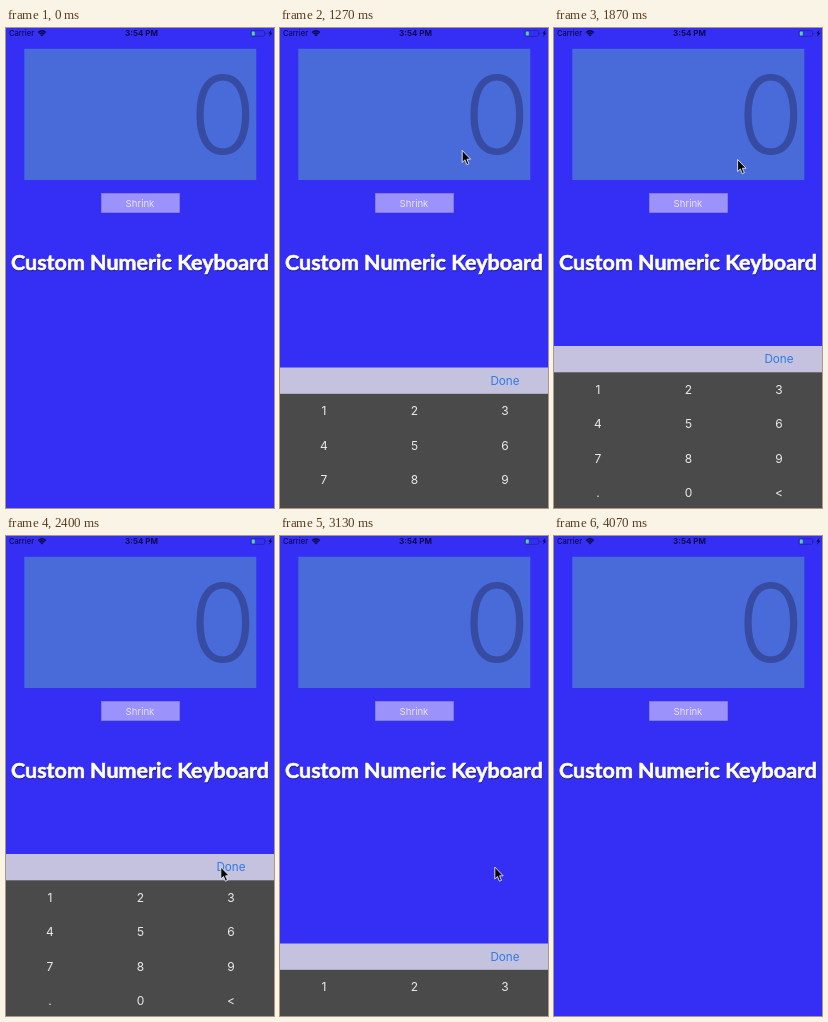
An HTML page that plays this animation: 268x480 px, repeating every 4190 ms.

```html
<!DOCTYPE html>
<html lang="en">
<head>
<meta charset="utf-8">
<title>Custom Numeric Keyboard</title>
<style>
  html, body { margin: 0; width: 100%; height: 100%; overflow: hidden; background: #352ff5; }
  svg { display: block; width: 100%; height: 100%; overflow: hidden; }
  text { font-family: Inter, "Liberation Sans", sans-serif; text-anchor: middle; }
  .digit { font-size: 108px; font-weight: 300; font-optical-sizing: none; fill: #374ba3; }
  .title { font: 700 21.5px Lato, sans-serif; fill: #fff; stroke: #fff; stroke-width: .6px; }
  .shade { fill: #14124f; stroke: #14124f; opacity: .75; filter: blur(.6px); }
  .keys text { font-size: 12px; fill: #ebebeb; }
</style>
</head>
<body>
<svg viewBox="0 0 268 480">
  <rect width="268" height="480" fill="#352ff5"/>

  <g fill="#0d0b4c">
    <text x="15.5" y="8" font-size="7.6" font-weight="500">Carrier</text>
    <text x="135.5" y="8" font-size="8" font-weight="700">3:54 PM</text>
    <path d="M36 8.6 L31.6 4 Q36 .2 40.4 4Z"/>
    <path d="M32.8 5.1 Q36 2.5 39.2 5.1 M34.2 6.6 Q36 5.2 37.8 6.6" fill="none" stroke="#352ff5" stroke-width=".5"/>
    <path d="M265.5 1.8 L262.3 5.6 H264 L263.2 8.8 L266.5 4.8 H264.7Z"/>
  </g>
  <rect x="245" y="2.7" width="13.5" height="5.6" rx="1.3" fill="none" stroke="#2422a2" stroke-width=".8"/>
  <rect x="245.8" y="3.4" width="3" height="4.2" rx=".6" fill="#55d889"/>
  <rect x="259.3" y="4.4" width="1" height="2.2" rx=".5" fill="#2422a2"/>

  <rect x="18.3" y="20.8" width="232" height="131.2" fill="#486bd9"/>
  <text class="digit" x="216.8" y="126">0</text>

  <rect x="95.3" y="165.3" width="78.4" height="19.4" fill="#9b92fb" stroke="#8380d0" stroke-width=".5"/>
  <text x="134" y="178.5" font-size="9.6" fill="#e6e4ff">Shrink</text>

  <g id="keyboard">
    <rect y="318" width="268" height="27" fill="#c4c2de"/>
    <text x="225" y="335.3" font-size="11.7" fill="#2f7ae6">Done</text>
    <rect y="344.3" width="268" height="136" fill="#4a4a4a"/>
    <g class="keys" id="keys"></g>
  </g>

  <text class="title shade" x="134.3" y="243">Custom Numeric Keyboard</text>
  <text class="title" x="134" y="242">Custom Numeric Keyboard</text>

  <path id="cursor" d="M0 0 V12 L2.7 9.5 L4.6 14.2 L6.7 13.3 L4.8 8.8 H8.4Z"
        fill="#080808" stroke="#e8e8f4" stroke-width=".9" stroke-linejoin="round"/>
</svg>
<script>
  const LOOP = 4190;
  const TRAVEL = 162.5;
  const keyboard = document.getElementById('keyboard');
  const keys = document.getElementById('keys');
  const cursor = document.getElementById('cursor');

  [...'123456789.0<'].forEach((label, i) => {
    const key = document.createElementNS('http://www.w3.org/2000/svg', 'text');
    key.setAttribute('x', 44 + (i % 3) * 90.5);
    key.setAttribute('y', 365.5 + Math.floor(i / 3) * 34.5);
    key.textContent = label;
    keys.append(key);
  });

  // time, x, y of the pointer tip
  const path = [
    [400, 275, 98],
    [730, 182.2, 117.5],
    [933, 182.2, 117.5],
    [1000, 182.2, 122.4],
    [1800, 182.2, 122.4],
    [2330, 214.8, 331],
    [3360, 214.8, 331],
    [3600, 275, 322]
  ];

  function pointerAt(t) {
    const next = path.findIndex(p => p[0] > t);
    if (next < 1) return [300, 100];
    const [a, b] = [path[next - 1], path[next]];
    const p = (t - a[0]) / (b[0] - a[0]);
    const e = p * p * (3 - 2 * p);
    return [1, 2].map(i => a[i] + (b[i] - a[i]) * e);
  }

  // critically damped spring, 0 to 1
  function spring(t, start) {
    const u = Math.max(0, t - start) * 0.02;
    return 1 - (1 + u) * Math.exp(-u);
  }

  function draw(now) {
    // the screen refreshes 15 times a second
    const t = Math.floor((now % LOOP + 5) * 0.015) / 0.015;
    const hidden = 1 - spring(t, 1090) + spring(t, 3041);
    keyboard.setAttribute('transform', `translate(0 ${(TRAVEL * hidden).toFixed(2)})`);
    cursor.setAttribute('transform', `translate(${pointerAt(t)})`);
  }

  const begin = performance.now();
  function tick() {
    draw(performance.now() - begin);
    requestAnimationFrame(tick);
  }
  tick();
</script>
</body>
</html>
```
